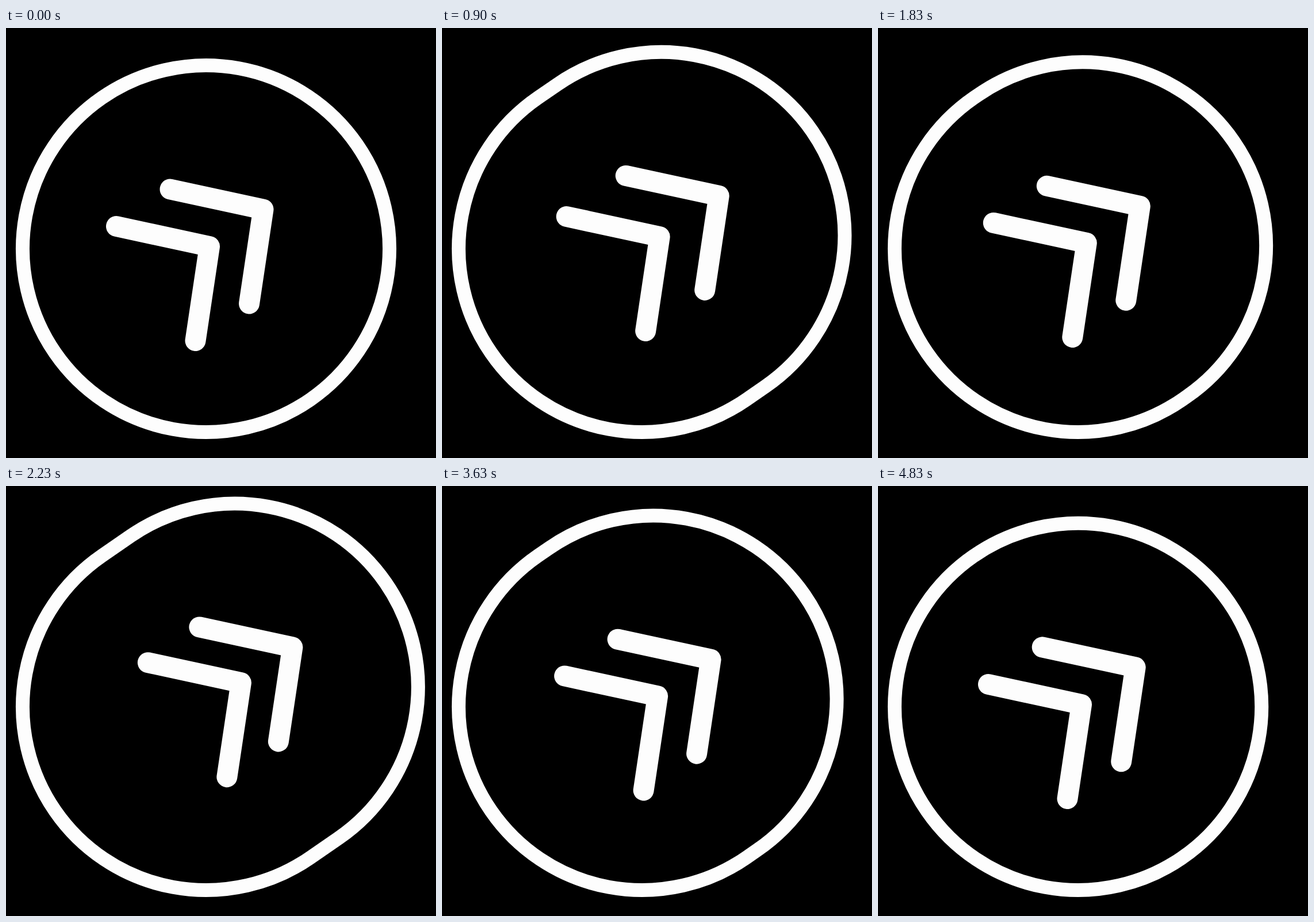
Recreate the animation shown at these times as an HTML page. Size 748 by 748 pixels, loop 5110 ms.

```html
<!DOCTYPE html>
<html lang="en">
<head>
<meta charset="utf-8">
<title>Nudging arrow</title>
<style>
  html, body { margin: 0; width: 100%; height: 100%; overflow: hidden; background: #000; }
  svg { display: block; width: 100%; height: 100%; }
  path { fill: none; stroke: #fdfdfd; stroke-linecap: round; stroke-linejoin: round; }
</style>
</head>
<body>
<svg viewBox="0 0 748 748">
  <path id="ring" stroke-width="24"/>
  <path id="front" stroke-width="36" d="M285.5 280.5 447.5 315.5 423 479.5"/>
  <path id="back" stroke-width="36" d="M192 345 354 380 329.5 544"/>
</svg>
<script>
const LOOP = 5110, CYCLE = 34;
const SLOPE = -0.69;
const CX = 348, CY = 384, R = 319;
const $ = id => document.getElementById(id);
const ring = $('ring'), front = $('front'), back = $('back');

// Cubic easing with control points (x1, 0) and (x2, 1).
function ease(x, x1, x2) {
  if (x <= 0) return 0;
  if (x >= 1) return 1;
  let lo = 0, hi = 1;
  for (let i = 0; i < 30; i++) {
    const u = (lo + hi) / 2, v = 1 - u;
    if (3 * v * v * u * x1 + 3 * v * u * u * x2 + u * u * u < x) lo = u;
    else hi = u;
  }
  return lo * lo * (3 - 2 * lo);
}

// Out to `size` at step `peak`, back to rest at step `end`.
function push(step, { size, peak, end, out, home }) {
  return size * (step < peak
    ? ease(step / peak, ...out)
    : 1 - ease((step - peak) / (end - peak), ...home));
}

const lead = { peak: 14, end: 30, out: [0.3, 0.54], home: [0.14, 0.385] };
const moves = {
  ring: { ...lead, size: 54 },
  front: { ...lead, size: 55 },
  back: { size: 56, peak: 12, end: 25, out: [0.33, 0.67], home: [0.3, 0.5] }
};

// A circle whose upper right half slides away by dx.
function ringPath(dx) {
  const dy = dx * SLOPE, len = Math.hypot(1, SLOPE);
  const nx = R * SLOPE / len, ny = -R / len;
  const at = (side, k) => `${CX + side * nx + k * dx} ${CY + side * ny + k * dy}`;
  const arc = `A${R} ${R} 0 0 1 `;
  return `M${at(1, 0)}L${at(1, 1)}${arc}${at(-1, 1)}L${at(-1, 0)}${arc}${at(1, 0)}Z`;
}

function slide(el, dx) {
  el.setAttribute('transform', `translate(${dx} ${dx * SLOPE})`);
}

function draw(now) {
  const t = now % LOOP;
  // Two steps per 100 ms: one of 30 ms, one of 70 ms.
  const step = (2 * Math.floor(t / 100) + (t % 100 >= 30 ? 1 : 0)) % CYCLE;
  ring.setAttribute('d', ringPath(push(step, moves.ring)));
  slide(front, push(step, moves.front));
  slide(back, push(step, moves.back));
}

let start;
function tick(now) {
  start ??= now;
  draw(now - start);
  requestAnimationFrame(tick);
}
draw(0);
requestAnimationFrame(tick);
</script>
</body>
</html>
```
